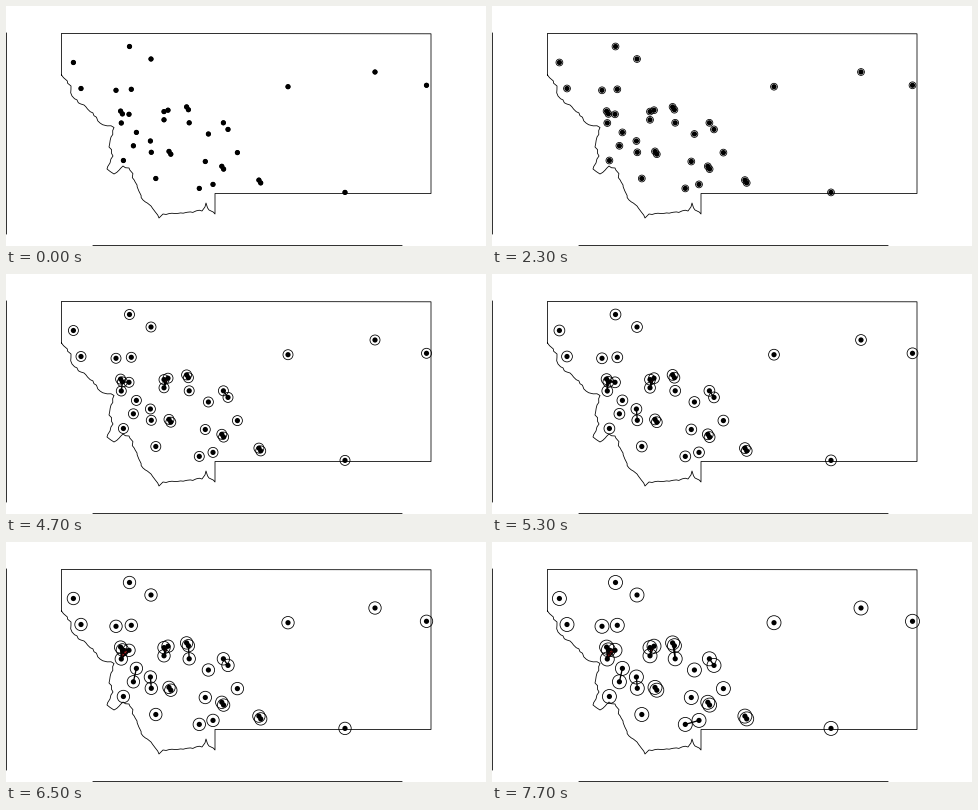
A matplotlib script that plays this animation: 480 by 240 pixels, repeating every 8000 ms.

```python
import itertools
import math

import matplotlib.pyplot as plt
import numpy as np
from matplotlib.animation import FuncAnimation
from matplotlib.collections import LineCollection, PolyCollection
from matplotlib.patches import Circle

WIDTH, HEIGHT, DPI = 480, 240, 100
PX = 72 / DPI
TICK, LOOP = 100, 8000
HOLD, STEP = 500, 300
DEGREE = np.array([30.8, 40.0])  # pixels per degree of longitude, latitude
REACH_PER_STEP = 0.0188  # degrees

# Key points of the mountain border; the ruggedness between them is random.
RIDGE = [
    (55.5, 69), (65, 80), (66, 90), (78, 99), (94, 117), (108, 121.5),
    (103, 141), (107, 150), (101, 163), (108, 168), (117, 160), (123, 162),
    (131, 179), (137, 194), (145, 200), (153, 212), (157, 208), (196, 205),
    (200, 197), (203, 204), (209, 208),
]
SINGLES = [
    (123.5, 40.5), (145, 53), (67.4, 56.5), (75, 82.5), (110, 84.3),
    (125.3, 83.3), (282, 80.7), (369, 66), (420.5, 79.3), (123, 108.3),
    (115.3, 117), (130.4, 126.4), (127.4, 139.8), (144.4, 135),
    (145.3, 146.3), (117.4, 154.5), (149.8, 172.5), (158, 105.6),
    (162, 104.2), (158, 113.8), (183.2, 116.8), (202.4, 128),
    (217.4, 116.8), (222, 123.4), (231.4, 146.6), (199.3, 155.5),
    (193.3, 182.4), (207, 178.4), (339, 186.4),
]
TWINS = [(115.5, 106.5), (181.5, 102.3), (216.7, 161.7), (253.8, 175.5),
         (163.9, 146.8)]
TWIN_OFFSET = np.array([0.9, 1.4])

sites = [np.array(p) for p in SINGLES]
for center in TWINS:
    sites += [center - TWIN_OFFSET, center + TWIN_OFFSET]


def rugged(points, rng, piece=3, jitter=0.6):
    path = []
    for a, b in zip(points, points[1:]):
        count = max(1, int(math.dist(a, b) / piece))
        part = np.linspace(a, b, count, endpoint=False)
        part[1:] += rng.normal(0, jitter, part[1:].shape)
        path.extend(part)
    return path + [points[-1]]


def simplices(size):
    """Groups of sites, each with its widest gap in degrees."""
    return [
        (max(np.hypot(*((a - b) / DEGREE))
             for a, b in itertools.combinations(group, 2)), group)
        for group in itertools.combinations(sites, size)
    ]


edges, triangles = simplices(2), simplices(3)

fig = plt.figure(figsize=(WIDTH / DPI, HEIGHT / DPI), dpi=DPI,
                 facecolor="white")
ax = fig.add_axes([0, 0, 1, 1])
ax.set_xlim(0, WIDTH)
ax.set_ylim(HEIGHT, 0)
ax.axis("off")


def draw_line(points):
    ax.plot(*zip(*points), color="black", lw=0.8 * PX, snap=False)


ridge = rugged(RIDGE, np.random.default_rng(4))
draw_line(ridge + [(209, 187.5), (425, 187.5), (425, 27.8), (55.5, 27.4),
                   ridge[0]])
draw_line([(0.5, 27), (0.5, 228)])
draw_line([(87, 239.5), (396, 239.5)])

faces = PolyCollection([], facecolors="#b02020", edgecolors="none", zorder=3)
links = LineCollection([], colors="black", linewidths=1.3 * PX, zorder=4)
ax.add_collection(faces)
ax.add_collection(links)

rings = []
for site in sites:
    ax.add_patch(Circle(site, 2.6, fc="black", ec="none", zorder=5))
    ring = Circle(site, 2, fill=False, ec="black", lw=0.8 * PX, zorder=4)
    rings.append(ax.add_patch(ring))


def update(frame):
    step = max(0, (frame * TICK - HOLD) // STEP + 1)
    for ring in rings:
        ring.set_radius(2 + 0.2 * step)
    reach = REACH_PER_STEP * step
    links.set_segments([group for gap, group in edges if gap <= reach])
    faces.set_verts([group for gap, group in triangles if gap <= reach])
    return [faces, links, *rings]


anim = FuncAnimation(fig, update, frames=LOOP // TICK, interval=TICK,
                     repeat=True, repeat_delay=0, blit=False)
plt.show()
```
